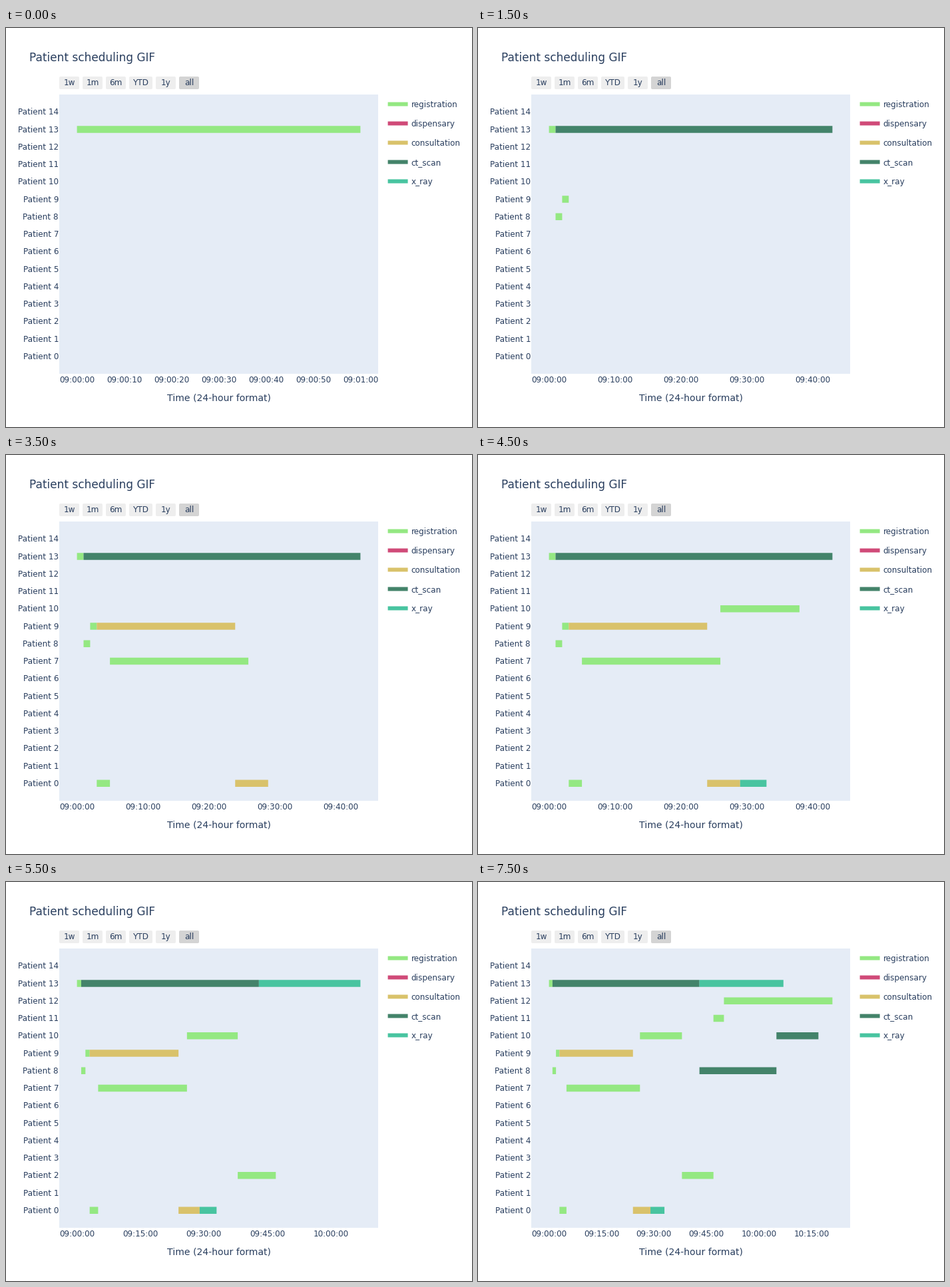
A matplotlib script for the animation above (8 s loop, 700 by 600 pixels).

```python
import matplotlib.pyplot as plt
from matplotlib.animation import FuncAnimation
from matplotlib.patches import FancyBboxPatch, Rectangle

W, H, DPI = 700, 600, 100
INK = "#2a3f5f"
LEFT, RIGHT, TOP, BOTTOM = 80, 559, 100, 520
PAD = (RIGHT - LEFT) / 18
ROW = (BOTTOM - TOP) / 16

COLORS = {
    "registration": "#94e882",
    "dispensary": "#d04a78",
    "consultation": "#d9c26b",
    "ct_scan": "#43836a",
    "x_ray": "#48c4a0",
}

# patient, task, start and end in minutes after 09:00
TASKS = [
    (13, "registration", 0, 1),
    (13, "ct_scan", 1, 43),
    (8, "registration", 1, 2),
    (9, "registration", 2, 3),
    (9, "consultation", 3, 24),
    (0, "registration", 3, 5),
    (7, "registration", 5, 26),
    (0, "consultation", 24, 29),
    (10, "registration", 26, 38),
    (0, "x_ray", 29, 33),
    (2, "registration", 38, 47),
    (13, "x_ray", 43, 67),
    (8, "ct_scan", 43, 65),
    (11, "registration", 47, 50),
    (12, "registration", 50, 81),
    (10, "ct_scan", 65, 77),
]

plt.rcParams["font.family"] = "DejaVu Sans"
fig = plt.figure(figsize=(W / DPI, H / DPI), dpi=DPI, facecolor="white")
ax = fig.add_axes([0, 0, 1, 1])
ax.set_xlim(0, W)
ax.set_ylim(H, 0)
ax.axis("off")


def text(x, y, s, px=12, ha="left"):
    return ax.text(x, y, s, size=px * 72 / DPI, color=INK, ha=ha, va="baseline")


def rect(x0, y0, x1, y1, color):
    patch = Rectangle((x0, y0), x1 - x0, y1 - y0, fc=color, lw=0, snap=False)
    return ax.add_patch(patch)


def button(x, w, label, color):
    r = 2
    ax.add_patch(FancyBboxPatch((x + r, 73 + r), w - 2 * r, 19 - 2 * r,
                                boxstyle=f"round,pad={r}", fc=color, lw=0, snap=False))
    text(x + w / 2, 86, label, ha="center")


def clock(minutes):
    s = round(minutes * 60)
    return f"{9 + s // 3600:02d}:{s // 60 % 60:02d}:{s % 60:02d}"


def tick_step(span):
    if span <= 1:
        return 1 / 6
    return 10 if span < 60 else 15


def draw_static():
    text(35, 50, "Patient scheduling GIF", 17)
    x = LEFT
    for label in ("1w", "1m", "6m", "YTD", "1y", "all"):
        w = 35 if label == "YTD" else 30
        button(x, w, label, "#d4d4d4" if label == "all" else "#eeeeee")
        x += w + 5
    rect(LEFT, TOP, RIGHT, BOTTOM, "#e5ecf6")
    for p in range(15):
        text(79, BOTTOM - (p + 1) * ROW + 4.2, f"Patient {p}", ha="right")
    text((LEFT + RIGHT) / 2, 561, "Time (24-hour format)", 14, "center")
    for i, (name, color) in enumerate(COLORS.items()):
        y = 114.5 + 29 * i
        rect(573.6, y - 3, 603.6, y + 3, color)
        text(608.6, y + 4.5, name)


draw_static()
bars = [rect(0, 0, 0, 0, COLORS[task]) for _, task, _, _ in TASKS]
ticks = [text(0, 533, "", ha="center") for _ in range(7)]


def update(step):
    span = max(end for *_, end in TASKS[:step + 1])
    scale = (RIGHT - LEFT - 2 * PAD) / span
    x0 = LEFT + PAD
    for i, (bar, (patient, _, start, end)) in enumerate(zip(bars, TASKS)):
        bar.set_visible(i <= step)
        y = BOTTOM - (patient + 1) * ROW
        bar.set_bounds(x0 + start * scale, y - 0.2 * ROW, (end - start) * scale, 0.4 * ROW)
    gap = tick_step(span)
    for i, tick in enumerate(ticks):
        minute = i * gap
        tick.set_x(x0 + minute * scale)
        tick.set_text(clock(minute) if minute <= span + 1e-6 else "")
    return bars + ticks


anim = FuncAnimation(fig, update, frames=len(TASKS), interval=500,
                     repeat=True, repeat_delay=0, blit=False)
plt.show()
```
